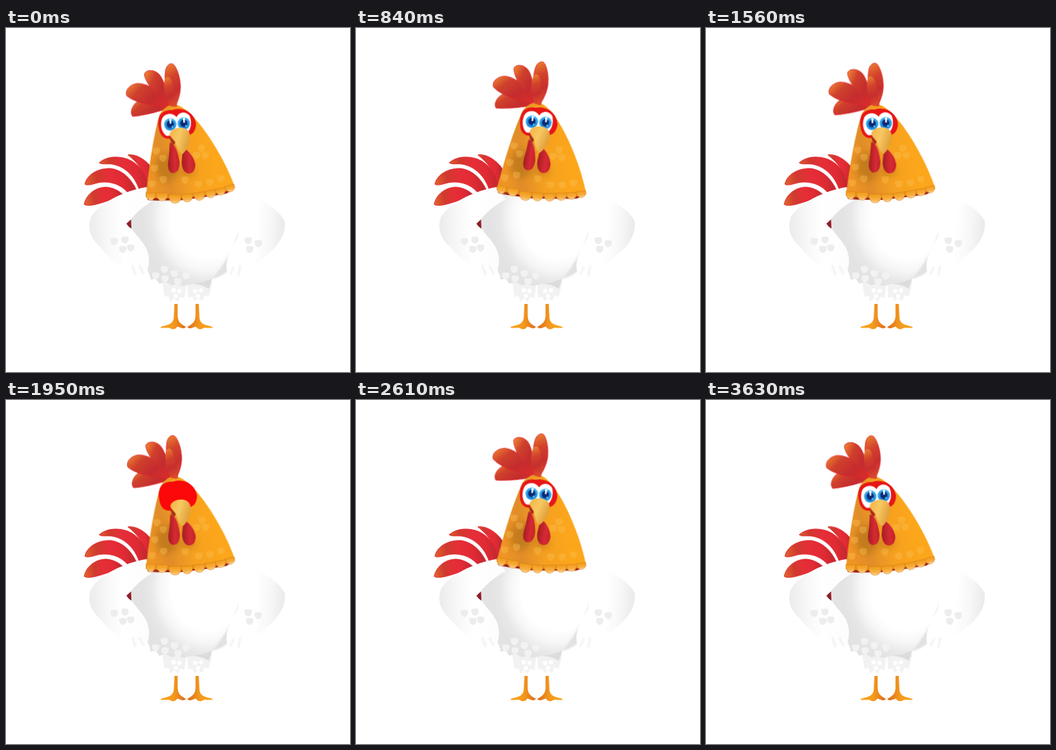
An HTML page for the animation above (4500 ms loop, 480 by 480 pixels).

```html
<!DOCTYPE html>
<html lang="en">
<head>
<meta charset="utf-8">
<title>Rooster</title>
<style>
  html, body { margin: 0; width: 100%; height: 100%; overflow: hidden; background: #fff; }
  svg { display: block; width: 100vw; height: 100vh; }
  #head { transform-origin: 262px 238px; animation: sway 4.5s cubic-bezier(.364, 0, .636, 1) infinite; }
  #lid { transform-origin: 240px 113px; animation: blink 4.5s linear infinite; }
  @keyframes sway {
    0%, 40%, 80%, 100% { transform: rotate(-1deg); }
    20%, 60% { transform: rotate(7.9deg); }
  }
  @keyframes blink {
    0%, 41.33%, 45.34%, 100% { transform: scaleY(0); }
    42.66%, 44% { transform: scaleY(1); }
  }
</style>
</head>
<body>
<svg viewBox="0 0 480 480">
  <defs>
    <linearGradient id="tail" x1="0" y1=".6" x2="1" y2=".5">
      <stop offset="0" stop-color="#e2622f"/><stop offset=".25" stop-color="#cf3a2e"/>
      <stop offset=".5" stop-color="#e62e38"/><stop offset=".75" stop-color="#e02a34"/><stop offset="1" stop-color="#b8282e"/>
    </linearGradient>
    <linearGradient id="comb" x1="0" y1=".2" x2="1" y2=".7">
      <stop offset="0" stop-color="#ea7a30"/><stop offset=".25" stop-color="#cf402c"/>
      <stop offset=".6" stop-color="#c42c2f"/><stop offset="1" stop-color="#da2c2a"/>
    </linearGradient>
    <linearGradient id="crest" x1=".4" y1="0" x2=".6" y2="1">
      <stop offset="0" stop-color="#e8782e"/><stop offset=".3" stop-color="#d2422c"/>
      <stop offset=".65" stop-color="#c62e2e"/><stop offset="1" stop-color="#dc4a2c"/>
    </linearGradient>
    <linearGradient id="face" gradientUnits="userSpaceOnUse" x1="198" y1="190" x2="290" y2="172">
      <stop offset="0" stop-color="#ef9524"/><stop offset=".25" stop-color="#e08c29"/>
      <stop offset=".6" stop-color="#f5a020"/><stop offset="1" stop-color="#fca61b"/>
    </linearGradient>
    <linearGradient id="scale" x1="0" y1="0" x2="0" y2="1">
      <stop offset=".2" stop-color="#f2a020"/><stop offset=".7" stop-color="#f8b24a"/><stop offset="1" stop-color="#ffe2a6"/>
    </linearGradient>
    <linearGradient id="beakFill" x1="0" y1="0" x2="1" y2=".4">
      <stop offset="0" stop-color="#f3b244"/><stop offset=".5" stop-color="#f8c862"/><stop offset="1" stop-color="#dfa03a"/>
    </linearGradient>
    <linearGradient id="wattle" x1="0" y1="0" x2="1" y2="0">
      <stop offset="0" stop-color="#a51c22"/><stop offset=".6" stop-color="#d62a34"/><stop offset="1" stop-color="#c3222a"/>
    </linearGradient>
    <linearGradient id="leg" x1="0" y1="0" x2="1" y2="0">
      <stop offset="0" stop-color="#f9a51c"/><stop offset=".5" stop-color="#f49a1d"/><stop offset="1" stop-color="#dd6c1c"/>
    </linearGradient>
    <radialGradient id="belly" gradientUnits="userSpaceOnUse" cx="0" cy="0" r="1" gradientTransform="translate(281 264) scale(92 104)">
      <stop offset=".55" stop-color="#fff"/><stop offset=".72" stop-color="#f6f6f6"/>
      <stop offset=".86" stop-color="#e8e8e8"/><stop offset="1" stop-color="#e3e3e3"/>
    </radialGradient>
    <linearGradient id="wingL" x1="0" y1=".5" x2="1" y2=".45">
      <stop offset="0" stop-color="#ebebeb"/><stop offset=".28" stop-color="#f8f8f8"/>
      <stop offset=".5" stop-color="#fff"/><stop offset="1" stop-color="#fcfcfc"/>
    </linearGradient>
    <linearGradient id="wingR" x1="1" y1=".5" x2="0" y2=".4">
      <stop offset="0" stop-color="#e9e9e9"/><stop offset=".25" stop-color="#f7f7f7"/><stop offset=".5" stop-color="#fff"/>
    </linearGradient>
    <radialGradient id="iris" cx=".5" cy=".55" r=".5">
      <stop offset=".3" stop-color="#0d3d91"/><stop offset=".62" stop-color="#1f86d6"/><stop offset="1" stop-color="#48b4ee"/>
    </radialGradient>
    <filter id="soft" x="-40%" y="-40%" width="180%" height="180%"><feGaussianBlur stdDeviation="5"/></filter>
    <filter id="haze"><feGaussianBlur stdDeviation="1"/></filter>

    <path id="scallop" d="M-9-6H9C9 2 5 6 0 6S-9 2-9-6Z"/>
    <path id="fleck" d="M-5-4Q0-6 5-4Q6 4 0 5Q-6 4-5-4Z"/>
    <path id="mask" d="M215 139C212 123 219 113 234 114C250 109 264 118 267 133C267 146 259 152 248 150L229 154C221 154 216 148 215 139Z"/>
    <g id="eye">
      <circle r="8.7" fill="url(#iris)"/>
      <circle cy="-.5" r="4.8" fill="#0b2a75"/>
      <path d="M-1.2-8H1.8L1.4-1H-.6Z" fill="#fff"/>
      <circle cx="3" cy="3.5" r="1.2" fill="#75cbf6"/>
    </g>
    <path id="foot" d="M235 385H239.5L239.5 402C240 408 242 411 246 414L251 417Q250 419 246 419L239 416.500Q237 421 231 420Q228 417.500 224 418.500L216 418.500Q214 417 221 415.500C229 414 233 411 234 405Z" fill="url(#leg)"/>
  </defs>

  <g fill="url(#tail)" stroke="#e3222a" stroke-width=".8">
    <path d="M170 177C181 175 196 184 204 196V224L197 219C193 200 184 188 170 177Z"/>
    <path d="M130 188C140 179 156 178 170 183C187 190 196 205 199 222L186 226C180 207 166 193 148 190C140 189 134 191 130 188Z"/>
    <path d="M110 218C113 204 129 195 147 196C164 199 175 211 182 226L171 231C160 217 143 213 128 216C118 219 113 220 110 218Z"/>
    <path d="M109 246C112 232 125 222 140 222C152 223 160 229 165 234C151 237 139 243 126 246C118 248 111 248 109 246Z"/>
  </g>

  <use href="#foot"/>
  <use href="#foot" transform="matrix(-1 0 0 1 504 0)"/>

  <g fill="#f2f2f2">
    <path d="M218 354H252L249 377L243 375L240 382L235 377L229 382L227 374L221 375Z"/>
    <path d="M253 354H288L283 375L277 373L274 381L268 377L263 381L260 375L254 376Z"/>
    <path d="M260 357L288 349L283 364Q272 357 260 357Z" fill="#dcdcdc"/>
  </g>
  <g fill="#fff">
    <circle cx="234" cy="366" r="3"/><circle cx="242" cy="367" r="3"/><circle cx="237" cy="374" r="3"/>
    <circle cx="264" cy="367" r="3"/><circle cx="272" cy="366" r="3"/><circle cx="268" cy="374" r="3"/>
  </g>

  <path d="M198 224C184 240 173 258 173 274C177 294 188 313 194 329C198 341 203 347 201 351L209 350L214 357L222 354L231 359L239 357L247 360L260 357L273 355L288 350C304 340 320 311 326 278L322 228Z" fill="url(#belly)"/>
  <path d="M325 284Q314 318 288 350Q304 346 310 338Q309 318 325 296Z" fill="#e2e2e2" filter="url(#haze)"/>

  <path d="M196 222C165 227 131 244 119 263C113 277 117 293 130 304C142 319 157 331 166 337L172 344L176 341L181 347L185 342L193 345C200 338 202 322 196 308C190 296 179 287 175 279L175 266C182 257 195 246 209 239Z" fill="url(#wingL)"/>
  <path d="M168 273L174.500 267L175 280Q171 278 168 273Z" fill="#8c1f29"/>
  <path d="M319 228C345 231 380 250 389 270C391 289 378 307 361 319C348 331 339 337 335 342L329 340L325 348L320 341L316 346L310 342C305 334 308 319 316 304C324 293 328 284 324 272C319 258 314 246 308 239Z" fill="url(#wingR)"/>
  <g fill="none" stroke="#e8e8e8" stroke-width="1.5" filter="url(#haze)">
    <path d="M176 331L181 345M186 331L192 343M318 333L313 344M327 331L324 346"/>
  </g>
  <g fill="#ededed">
    <use href="#fleck" x="151" y="298"/><use href="#fleck" x="163" y="309"/>
    <use href="#fleck" x="166" y="296"/><use href="#fleck" x="174" y="307"/>
    <use href="#fleck" x="338" y="297"/><use href="#fleck" x="352" y="301"/><use href="#fleck" x="340" y="309"/>
  </g>
  <g fill="#f2f2f2">
    <use href="#fleck" x="221" y="337"/><use href="#fleck" x="235" y="343"/><use href="#fleck" x="222" y="350"/>
    <use href="#fleck" x="240" y="354"/><use href="#fleck" x="251" y="346"/><use href="#fleck" x="209" y="346"/>
  </g>

  <g id="head">
    <g fill="url(#comb)" stroke="#e3222a" stroke-width=".8" transform="translate(2 -1)">
      <path d="M238 108C220 116 192 122 177 123C172 118 176 106 187 100C199 96 218 98 232 104Z"/>
      <path d="M236 110C207 110 180 104 169 94C166 86 174 78 184 77C198 77 211 86 230 101Z"/>
      <path d="M236 109C213 100 196 78 194 65C195 58 207 57 214 64C220 70 222 82 232 98Z"/>
    </g>

    <path d="M196 232L319 222L317 227L307 232L293 234L278 236L262 238L244 240L212 240L198 239Z" fill="#9d2218"/>
    <path d="M216 121C220 113 227 107 236 106C246 107 257 116 267 128C287 152 308 189 320 224C295 235 230 240 195 235C199 204 205 158 216 121Z" fill="url(#face)"/>
    <ellipse cx="225" cy="194" rx="16" ry="20" fill="#b06f18" opacity=".6" filter="url(#soft)"/>
    <ellipse cx="254" cy="200" rx="12" ry="8" fill="#bd7514" opacity=".5" filter="url(#soft)"/>
    <g fill="#fbc04f" opacity=".4">
      <use href="#fleck" x="211" y="171"/><use href="#fleck" x="220" y="181"/><use href="#fleck" x="208" y="195"/>
      <use href="#fleck" x="220" y="211"/><use href="#fleck" x="204" y="217"/><use href="#fleck" x="274" y="168"/>
      <use href="#fleck" x="279" y="178"/><use href="#fleck" x="267" y="178"/><use href="#fleck" x="250" y="212"/>
      <use href="#fleck" x="269" y="218"/><use href="#fleck" x="285" y="216"/><use href="#fleck" x="300" y="211"/>
    </g>
    <g fill="url(#scale)" stroke="#d77a18" stroke-width=".7">
      <use href="#scallop" transform="translate(202 234) scale(.75 .9)"/>
      <use href="#scallop" transform="translate(218 235) scale(.9)"/>
      <use href="#scallop" transform="translate(236 238)"/>
      <use href="#scallop" transform="translate(253 237) rotate(-5) scale(.9)"/>
      <use href="#scallop" transform="translate(270 235) rotate(-8) scale(.9)"/>
      <use href="#scallop" transform="translate(286 232) rotate(-9) scale(.85)"/>
      <use href="#scallop" transform="translate(300 229) rotate(-10) scale(.8)"/>
      <use href="#scallop" transform="translate(313 225) rotate(-14) scale(.75)"/>
    </g>

    <g fill="url(#crest)" stroke="#e3222a" stroke-width=".8">
      <path d="M236 109C229 96 222 74 226 57C229 48 236 47 239 53C244 61 247 75 246 85C245 96 241 103 239 109Z"/>
      <path d="M232 109C224 97 221 80 225 70C228 65 233 68 235 76C238 88 240 99 241 109Z" stroke="none"/>
    </g>

    <path d="M230 159C237 161 241 171 243 187C243 198 239 202 233 202C228 201 226 195 227 187C229 176 229 168 230 159Z" fill="url(#wattle)"/>
    <path d="M248 167C256 170 263 180 265 190C265 199 261 203 255 203C249 202 246 195 246 187Z" fill="url(#wattle)"/>

    <use href="#mask" fill="#e81616"/>
    <path d="M240 124C235 117 224 118 220 125C216 134 219 146 226 150L235 149L253 147C260 143 262 131 258 122C252 115 243 117 240 124Z" fill="#fff"/>
    <use href="#eye" x="231" y="134"/>
    <use href="#eye" x="250" y="133"/>
    <use id="lid" href="#mask" fill="#fb0808"/>

    <path d="M230 150Q230 158 235 163L239 157Z" fill="#a92c18"/>
    <path d="M230 147C232 141 240 138 248 139C256 140 260 147 258 156C256 166 251 173 247 176C241 172 240 164 237 158C234 154 230 151 230 147Z" fill="url(#beakFill)"/>
  </g>
</svg>
</body>
</html>
```
